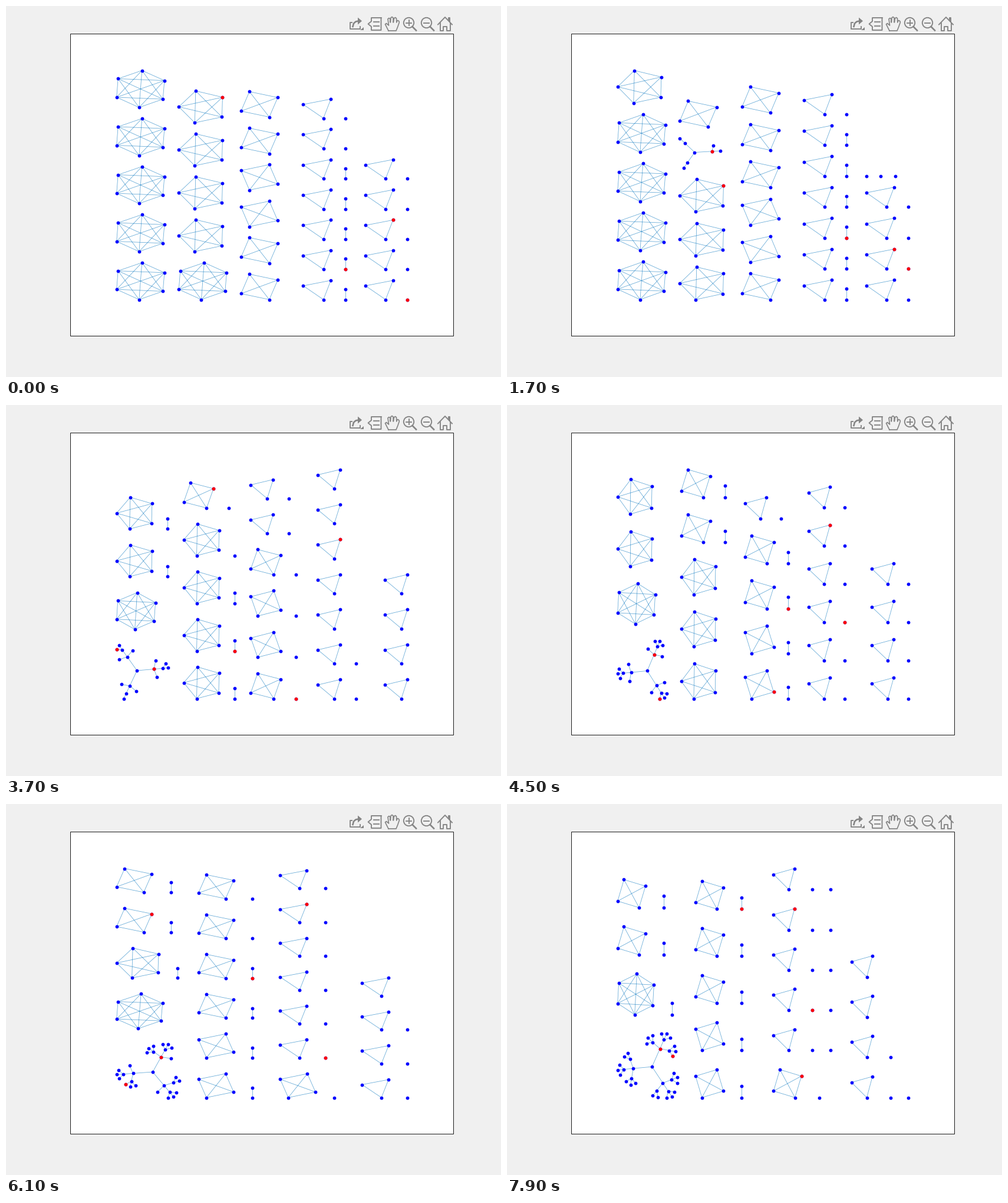
Write a matplotlib script that moves like this. It is 840 px wide and 630 px high and loops after 8 s.

```python
import itertools
import math
import random

import numpy as np
import matplotlib.pyplot as plt
from matplotlib.animation import FuncAnimation
from matplotlib.collections import LineCollection
from matplotlib.patches import Circle, Polygon, Rectangle

W, H, DPI = 840, 630, 100
PX = 72 / DPI
LEFT, RIGHT, TOP, BOTTOM = 187.7, 681.2, 109.5, 498.5
GREY = "#858585"
TOTAL = 133  # nodes over all components
KINDS = (6, 5, 4, 3, 2, 1)

# Unit shapes of the complete graphs, y up, and their box sizes.
SHAPES = {
    6: [(0, .275), (.03, .777), (.53, 1), (1, .728), (.967, .224), (.47, 0)],
    5: [(0, .5), (.385, 1), (1, .8), (.987, .18), (.365, 0)],
    4: [(0, .233), (.228, 1), (1, .767), (.77, 0)],
    3: [(0, .72), (1, 1), (.73, 0)],
    2: [(0, 0), (0, 1)],
    1: [(0, 0)],
}
SIZES = {6: (1, 1), 5: (.913, .862), 4: (.767, .688),
         3: (.577, .518), 2: (0, .282), 1: (0, 0)}

# Key points: step, number of cliques of 6 to 1 nodes, tree width and height,
# column height. The tree holds all nodes that are in no clique.
STAGES = np.array([
    (0, 6, 4, 6, 12, 5, 7, .45, .4, 6.52),
    (9, 4, 4, 7, 11, 6, 8, .85, .78, 6.45),
    (13, 3, 5, 5, 12, 7, 8, 1.1, 1.05, 6.2),
    (19, 1, 6, 5, 13, 5, 10, 1.33, 1.45, 6.95),
    (23, 1, 5, 6, 11, 6, 11, 1.3, 1.42, 6.2),
    (31, 1, 1, 9, 10, 7, 12, 1.37, 1.53, 7.5),
    (40, 1, 0, 8, 9, 8, 14, 1.65, 1.57, 6.5),
])


def clique(kind, flip=False):
    pts = np.array(SHAPES[kind], float)
    if flip:
        pts[:, 1] = 1 - pts[:, 1]
    edges = list(itertools.combinations(range(kind), 2))
    return kind, pts * SIZES[kind], edges, SIZES[kind]


def tree(count, size, turn):
    """Three arms grow in turn; each arm node gets up to three children."""
    arms = [[], [], []]
    pts, edges = [(0, 0)], []
    for i in range(1, count):
        arm = arms[(i - 1) % 3]
        j = len(arm)
        if j == 0:
            parent, depth, angle = 0, 0, turn + 120 * ((i - 1) % 3)
        else:
            parent, depth, angle = arm[(j - 1) // 3]
            depth += 1
            angle += (0, 1, -1)[(j - 1) % 3] * (100 - 25 * depth)
        arm.append((i, depth, angle))
        a, reach = math.radians(angle), 1 / (1 + depth)
        x, y = pts[parent]
        pts.append((x + reach * math.cos(a), y + reach * math.sin(a)))
        edges.append((parent, i))
    pts = np.array(pts)
    return 0, (pts - pts.min(0)) / np.ptp(pts, axis=0) * size, edges, size


def pack(big, small, limit):
    """Stack parts in columns, then fill the free ends of rows."""
    cell_w, cell_h = np.max([part[3] for part in big], axis=0)
    gap_x, gap_y = .3 * cell_w, .3 * cell_h
    rows, placed = [], []
    col, y = 0, 0

    def add_row(part):
        nonlocal col, y
        w, h = part[3]
        if y + h + gap_y > limit:
            col, y = col + 1, 0
        rows.append([col, y, w])
        placed.append((part, col * (cell_w + gap_x), y))
        y += h + gap_y

    for part in big:
        add_row(part)
    for part in small:
        for row in rows:
            if row[2] + gap_x <= cell_w + 1e-9:
                row[2] += gap_x
                placed.append((part, row[0] * (cell_w + gap_x) + row[2], row[1]))
                break
        else:
            add_row(part)
    return placed


def pick_active(step, num, tree_n):
    """Active nodes as (kind, place among its kind, node); kind 0 is the tree."""
    rng = random.Random(step)
    kind = 5 if step < 16 else 4
    active = {
        (kind, rng.randrange(num[kind]), kind // 2),
        (3, round(9 - .16 * step), 1),
        (2, max(1, round(.18 * step)), 0),
        (1, 2 + (step > 20), 0),
        (0, 0, 1),
    }
    if tree_n > 15:
        active.add((0, 0, tree_n - 1))
    return active


def layout(step):
    *counts, tree_w, tree_h, limit = [
        float(np.interp(step, STAGES[:, 0], col)) for col in STAGES.T[1:]]
    num = {kind: int(c + .5) for kind, c in zip(KINDS, counts)}
    tree_n = TOTAL - sum(kind * n for kind, n in num.items())

    big = [clique(kind, kind == 4 and i % 6 in (2, 3))
           for kind in KINDS[:4] for i in range(num[kind])]
    if tree_n > 2:
        big.append(tree(tree_n, (tree_w, tree_h), 65 if step > 20 else 5))
    big.sort(key=lambda part: -part[3][0] * part[3][1])
    small = [clique(kind) for kind in (2, 1) for _ in range(num[kind])]

    active = pick_active(step, num, tree_n)
    points, lines, hot = [], [], []
    seen = dict.fromkeys(range(7), 0)
    for (kind, pts, edges, _), x, y in pack(big, small, limit):
        base = len(points)
        points.extend(pts + (x, y))
        lines.extend((base + a, base + b) for a, b in edges)
        hot.extend(base + n for k, i, n in active if (k, i) == (kind, seen[kind]))
        seen[kind] += 1

    points = np.array(points)
    points = (points - points.min(0)) / np.ptp(points, axis=0)
    points = points * (RIGHT - LEFT, TOP - BOTTOM) + (LEFT, BOTTOM)
    return points, points[np.array(lines)], hot


fig = plt.figure(figsize=(W / DPI, H / DPI), dpi=DPI, facecolor="#f0f0f0")
ax = fig.add_axes([0, 0, 1, 1])
ax.set(xlim=(0, W), ylim=(H, 0))
ax.axis("off")
ax.add_patch(Rectangle((109.5, 47.5), 650, 513, fc="white", ec="#1c1c1c",
                       lw=PX, snap=False))


def stroke(*pts, lw=1.9):
    ax.plot(*zip(*pts), color=GREY, lw=lw * PX, solid_joinstyle="round")


def fill(*pts):
    ax.add_patch(Polygon(pts, fc=GREY, ec="none"))


def share_icon():
    stroke((587, 28), (583.8, 28), (583.8, 39), (601, 39), (601, 35))
    stroke((588.5, 35), (590, 29.5), (593.5, 26.5), (598, 25.5), lw=2.6)
    fill((597, 19.5), (604, 25.5), (597, 31.5))
    fill((606.5, 35.5), (606.5, 41), (601, 41))


def tip_icon():
    stroke((636.5, 20), (620, 20), (620, 26), (614.5, 30.5), (620, 35),
           (620, 41), (636.5, 41), (636.5, 20))
    for y in (27, 34):
        stroke((624, y), (633, y))


def hand_icon():
    pts = [(649, 42), (643.5, 31), (645.5, 29.5), (649.5, 33)]
    for x, y in [(650, 20.5), (655, 18.5), (660.5, 19.5), (665, 24.5)]:
        pts += [(x - 2, y + 1.5), (x, y), (x + 2, y + 1.5), (x + 2.3, 28)]
    stroke(*pts, (664.5, 36), (662, 42), (649, 42), lw=1.7)


def lens_icon(x, plus):
    ax.add_patch(Circle((x, 28.5), 8.7, fc="none", ec=GREY, lw=1.9 * PX))
    stroke((x + 6, 35), (x + 12.5, 41.5), lw=2.6)
    stroke((x - 4.5, 28.5), (x + 4.5, 28.5))
    if plus:
        stroke((x, 24), (x, 33))


def home_icon():
    stroke((733, 31.5), (745, 19), (757, 31.5))
    stroke((753, 27), (753, 19.5), (750.5, 19.5), (750.5, 24))
    stroke((736.5, 29), (736.5, 42), (742, 42), (742, 34.5), (748, 34.5),
           (748, 42), (753.5, 42), (753.5, 29))


share_icon()
tip_icon()
hand_icon()
lens_icon(683.5, True)
lens_icon(713.5, False)
home_icon()

edges = LineCollection([], colors=[(0, .447, .741, .6)], linewidths=.8 * PX,
                       zorder=3)
ax.add_collection(edges)
dot = dict(s=(5.8 * PX) ** 2, linewidths=0)
nodes = ax.scatter([], [], color="#0000ff", zorder=4, **dot)
reds = ax.scatter([], [], color="#ff0000", zorder=5, **dot)


def draw(frame):
    points, lines, hot = layout((frame + 1) // 2)
    edges.set_segments(lines)
    nodes.set_offsets(points)
    reds.set_offsets(points[hot])
    return edges, nodes, reds


anim = FuncAnimation(fig, draw, frames=80, interval=100, repeat=True,
                     repeat_delay=0)
plt.show()
```
